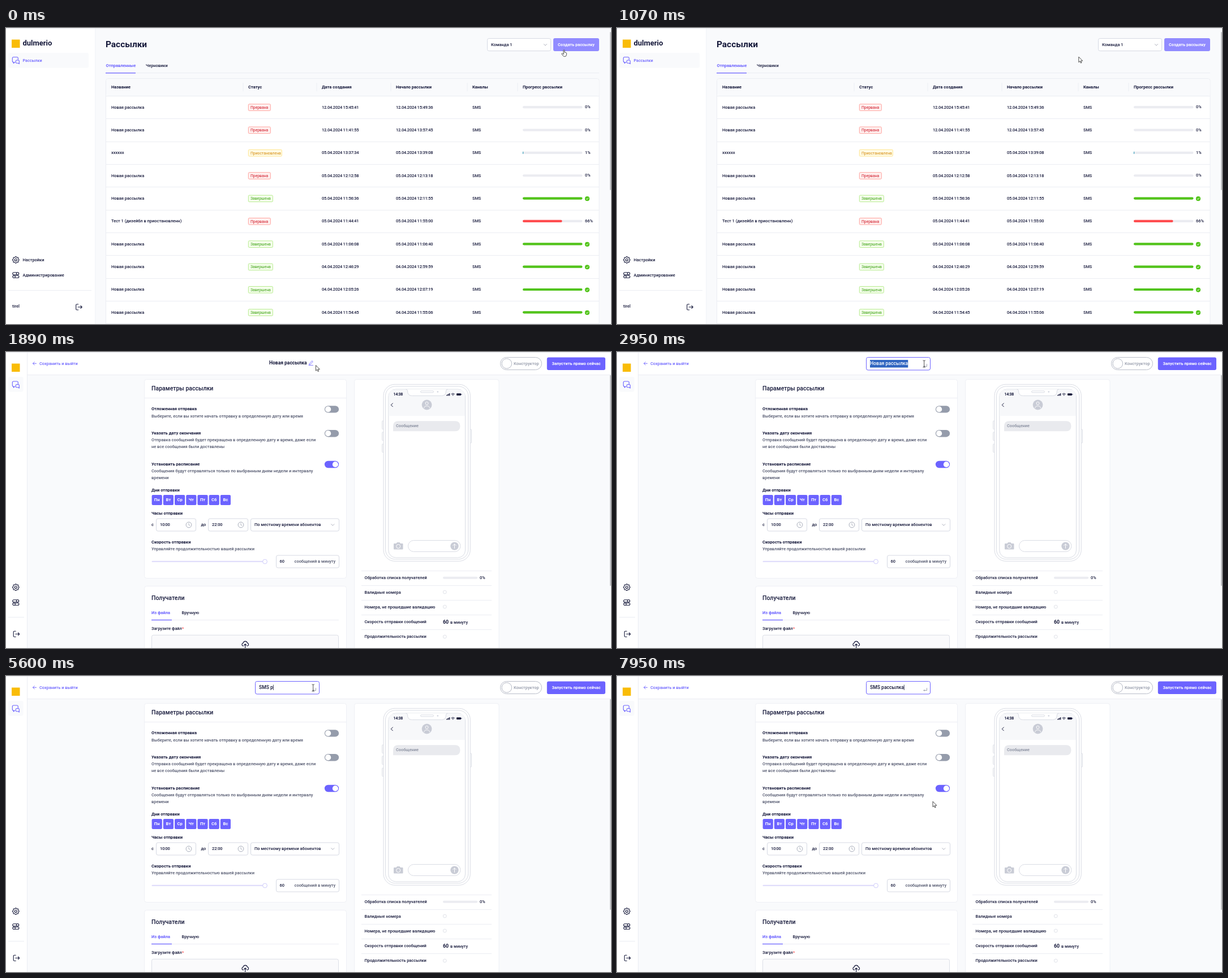
An HTML page that plays this animation: 1069x524 px, repeating every 7990 ms.

```html
<!DOCTYPE html>
<html lang="ru">
<head>
<meta charset="utf-8">
<title>Рассылки</title>
<style>
  html, body { margin: 0; width: 100%; height: 100%; overflow: hidden; background: #f9fafc; }
  #stage { display: block; width: 1069px; height: 524px; }
  text { font-family: Roboto, "Open Sans", sans-serif; white-space: pre; }
  .icon { fill: none; stroke: #15183a; stroke-width: 1.1; stroke-linejoin: round; stroke-linecap: round; }
</style>
</head>
<body>
<svg id="stage" viewBox="0 0 1069 524"></svg>
<script>
const INK = '#15183a', SOFT = '#50556c', GRAY = '#9298a8', LINE = '#ebedf3', EDGE = '#d6d9e3',
      VIOLET = '#6c63ff', PALE = '#918bff', GREEN = '#52c41a';
const LOOP = 7990;

const text = (x, y, s, o = {}) =>
  `<text x="${x}" y="${y}" font-size="${o.size || 7.45}" font-weight="${o.w || 500}" fill="${o.fill || INK}"` +
  ` text-anchor="${o.mid ? 'middle' : 'start'}" letter-spacing="${o.gap || 0}">${s}</text>`;
const rect = (x, y, w, h, fill, r = 0, stroke = 'none', id = '') =>
  `<rect x="${x}" y="${y}" width="${w}" height="${h}" rx="${r}" fill="${fill}" stroke="${stroke}" ${id && `id="${id}"`}/>`;
const disc = (x, y, r, fill, stroke = 'none') =>
  `<circle cx="${x}" cy="${y}" r="${r}" fill="${fill}" stroke="${stroke}"/>`;
const path = (d, stroke = INK, w = 1, fill = 'none') =>
  `<path d="${d}" fill="${fill}" stroke="${stroke}" stroke-width="${w}" stroke-linecap="round" stroke-linejoin="round"/>`;
const hline = (x, y, w, c = LINE) => rect(x, y, w, 1, c);
const chevron = (x, y) => path(`M${x - 2.6} ${y - 1.3}l2.6 2.6l2.6-2.6`, '#a4a9b6', .9);
const group = (id, body) => `<g id="${id}">${body}</g>`;
const icon = (id, body) => `<g id="${id}" class="icon">${body}</g>`;
const bold = { w: 600, size: 7.5 }, white = { w: 600, size: 7.4, fill: '#fff', mid: true };

function tableRow([name, state, made, start, done], i) {
  const y = 140 + i * 40.35;
  const [label, w, bg, edge, ink] = {
    stop: ['Прервана', 39, '#fff1f0', '#ffa39e', '#cf1322'],
    hold: ['Приостановлена', 59, '#fffbe6', '#ffe58f', '#d48806'],
    done: ['Завершена', 43, '#f6ffed', '#b7eb8f', '#389e0d']
  }[state];
  const full = done === 100;
  const color = full ? GREEN : state === 'stop' ? '#ff4d4f' : '#2f9bb8';
  return text(186, y + 2.5, name) +
    rect(428.3, y - 5.3, w, 11.6, bg, 1.5, edge) + text(432, y + 2.8, label, { w: 400, size: 6.8, fill: ink }) +
    text(558, y + 2.5, made, { gap: -.2 }) + text(689, y + 2.5, start, { gap: -.2 }) +
    text(824, y + 2.5, 'SMS', { size: 7.3 }) +
    rect(913, y - 1.9, 105.5, 4.2, '#ebecf1', 2.1) +
    (done ? rect(913, y - 1.9, 1.055 * done, 4.2, color, done > 2 ? 2.1 : .5) : '') +
    (full ? disc(1027, y + .8, 4.1, GREEN) + path(`M1025.3 ${y + .9}l1.2 1.3l2.2-2.6`, '#fff', .9)
          : text(1023, y + 2.2, done + '%')) +
    hline(177, Math.round(y + 20.2), 871);
}

function listPage() {
  const heads = [[186, 'Название'], [428, 'Статус'], [558, 'Дата создания'], [689, 'Начало рассылки'],
                 [824, 'Каналы'], [913, 'Прогресс рассылки']];
  const plain = 'Новая рассылка';
  const rows = [
    [plain, 'stop', '12.04.2024 15:45:41', '12.04.2024 15:49:36', 0],
    [plain, 'stop', '12.04.2024 11:41:55', '12.04.2024 13:57:45', 0],
    ['xxxxxx', 'hold', '05.04.2024 13:37:34', '05.04.2024 13:39:08', 1],
    [plain, 'stop', '05.04.2024 12:12:58', '05.04.2024 12:13:18', 0],
    [plain, 'done', '05.04.2024 11:56:36', '05.04.2024 12:11:55', 100],
    ['Тест 1 (дизейбл в приостановленн)', 'stop', '05.04.2024 11:44:41', '05.04.2024 11:55:00', 66],
    [plain, 'done', '05.04.2024 11:06:08', '05.04.2024 11:06:40', 100],
    [plain, 'done', '04.04.2024 12:46:29', '04.04.2024 12:59:59', 100],
    [plain, 'done', '04.04.2024 12:05:26', '04.04.2024 12:07:19', 100],
    [plain, 'done', '04.04.2024 11:54:45', '04.04.2024 11:55:06', 100]
  ];
  return text(176, 33.6, 'Рассылки', { size: 15.4, w: 600 }) +
    hline(176, 79, 872) + rect(176, 79, 53, 1.3, VIOLET) +
    text(176.5, 69, 'Отправленные', { ...bold, fill: VIOLET }) + text(247, 69, 'Черновики') +
    rect(850.5, 18.5, 112, 22, '#fff', 3, EDGE) + text(857, 31.5, 'Команда 1') + chevron(953, 29.8) +
    rect(967, 18, 81, 23, 'none', 3, VIOLET, 'wave') + rect(967, 18, 81, 23, PALE, 3, 'none', 'create') +
    text(1007.5, 31.6, 'Создать рассылку', white) +
    rect(176.5, 89.5, 871.5, 450, '#fff', 4, LINE) + rect(177, 90, 870.5, 30, '#f9fafc', 4) + hline(177, 120, 871) +
    heads.map(([x, s], i) => text(x, 106.5, s, bold) + (i ? rect(x - 9.5, 97, 1, 15, LINE) : '')).join('') +
    rows.map(tableRow).join('') +
    rect(1067, 7, 2, 280, '#c3c4c8', 1);
}

const toggle = (y, on) => rect(562.9, y - 6.2, 25.2, 12.4, on ? VIOLET : '#959cab', 6.2) +
  disc(on ? 581.9 : 569.1, y, 5.1, '#fff');
const field = (x, y, w) => rect(x + .5, y + .5, w, 22, '#fff', 3, EDGE);
const clock = x => `<g transform="translate(${x} 306)">` + disc(0, 0, 4.9, 'none', '#a9aebb') +
  path('M0-2.7v2.9l2 1', '#a9aebb', .9) + '</g>';

function settingsCard() {
  const desc = (y, s) => text(257, y, s, { fill: SOFT });
  const head = (y, s) => text(257, y, s, { w: 600, size: 7.6 });
  return rect(244.5, 48.5, 357, 352, '#fff', 4, '#eef0f5') + hline(245, 81, 357) +
    text(257, 67.7, 'Параметры рассылки', { size: 10.5 }) +
    head(103.3, 'Отложенная отправка') + toggle(101.4) +
    desc(115.5, 'Выберите, если вы хотите начать отправку в определенную дату или время') +
    head(145.8, 'Указать дату окончания') + toggle(144.2) +
    desc(158, 'Отправка сообщений будет прекращена в определенную дату и время, даже если') +
    desc(170.3, 'не все сообщения были доставлены') +
    head(200.8, 'Установить расписание') + toggle(199, true) +
    desc(213, 'Сообщения будут отправляться только по выбранным дням недели и интервалу') +
    desc(225.3, 'времени') +
    head(246.5, 'Дни отправки') +
    ['Пн', 'Вт', 'Ср', 'Чт', 'Пт', 'Сб', 'Вс'].map((d, i) => {
      const x = 257.6 + 20.2 * i;
      return rect(x, 252.9, 18.2, 18.2, VIOLET, 2) + text(x + 9.1, 264.3, d, { ...white, size: 7.6 });
    }).join('') +
    head(288.2, 'Часы отправки') + text(257, 308, 'с') + text(344.5, 308, 'до') +
    field(265, 294.5, 70) + text(272, 308, '10:00', { gap: -.3 }) + clock(323) +
    field(357, 294.5, 70) + text(364, 308, '22:00', { gap: -.1 }) + clock(415) +
    field(432, 294.5, 156) + text(439, 308, 'По местному времени абонентов') + chevron(577.3, 306) +
    head(338.6, 'Скорость отправки') + desc(351, 'Управляйте продолжительностью вашей рассылки') +
    rect(257.5, 369.8, 200, 2.2, '#e0ddfb', 1.1) + disc(457.5, 371, 3.9, '#fff', '#cfccfb') +
    field(477, 359.5, 111) + text(483.5, 373, '60') + text(509.5, 373, 'сообщений в минуту', { fill: SOFT });
}

function recipientsCard() {
  return rect(244.5, 414.5, 357, 140, '#fff', 4, '#eef0f5') +
    text(257, 438.8, 'Получатели', { size: 10.5 }) +
    text(257, 464, 'Из файла', { ...bold, fill: VIOLET }) + text(310.5, 464, 'Вручную') +
    hline(257, 474, 331) + rect(257, 473.8, 36, 1.3, VIOLET) +
    text(257, 492.2, 'Загрузите файл <tspan fill="#ff4d4f" dx="-1.5">*</tspan>', { size: 7.3 }) +
    rect(257.5, 501.2, 330, 50, '#fafafc', 3, '#dcdfe7') +
    path('M419.5 520.5q-2.6-.4-2.6-2.8q.1-2.2 2.2-2.6q.8-3 3.6-3q3 0 3.8 3q2.1.5 2.1 2.7q0 2.3-2.6 2.7M422.7 524v-7m-2 2l2-2l2 2', INK, 1.1);
}

function phoneCard() {
  const ghost = '#d9dce4';
  const stats = ['Обработка списка получателей', 'Валидные номера', 'Номера, не прошедшие валидацию',
                 'Скорость отправки сообщений', 'Продолжительность рассылки'];
  const keys = [122, 142, 163].map(y => rect(664.7, y, 2.5, 14.5, '#fff', 1, ghost)).join('');
  return rect(615.5, 48.5, 255.5, 500, '#fff', 4, '#eef0f5') +
    keys + rect(820, 137, 2.5, 24, '#fff', 1, ghost) +
    rect(667, 57.3, 153.3, 313, '#fff', 20, ghost) + rect(670.5, 60.8, 146.3, 306, '#fff', 17, ghost) +
    rect(675.8, 66, 135.7, 298, '#fff', 13, ghost) +
    path('M676.3 113V79q0-12.5 12.5-12.5h110q12.3 0 12.3 12.5v34z', 'none', 0, '#f7f8fa') +
    path('M707 66q2.5 0 2.5 3q0 8.5 8 8.5h52q8 0 8-8.5q0-3 2.5-3', ghost, 1, '#fff') +
    rect(732.5, 68.8, 23, 3, '#fff', 1.5, ghost) + disc(762.8, 70.5, 1.4, ghost) +
    text(684.5, 77, '14:38', { w: 700, size: 7, gap: -.3 }) +
    [0, 1, 2, 3].map(i => rect(778 + i * 1.7, 76 - i, 1.2, 1.4 + i, INK)).join('') +
    path('M787 74.2q2.7-2.3 5.4 0M788.2 75.6q1.5-1.2 3 0', INK, .9) + disc(789.7, 76.8, .6, INK) +
    rect(796, 73.2, 8, 3.8, INK, 1) + rect(804.5, 74.2, .8, 1.8, INK) +
    path('M683.3 90.8l-3 3l3 3', INK, 1) +
    disc(743.6, 93.5, 8.9, '#c9ccd6') + disc(743.6, 90.8, 2.5, 'none', '#fff') +
    path('M738.7 99q0-3.5 4.9-3.5q4.9 0 4.9 3.5', '#fff', .9) +
    path('M684 140.3v-9q0-9 9-9h100.500q9 0 9 9q0 9-9 9z', 'none', 0, '#e9eaee') +
    text(689, 133.4, 'Сообщение', { fill: '#858b9c', size: 7.4 }) +
    path('M686 339h3.5l1.5-2h4.5l1.5 2h3.5q1 0 1 1v8.5q0 1-1 1h-14.5q-1 0-1-1v-8.5q0-1 1-1z', 'none', 0, '#c9ccd6') +
    disc(693.2, 344, 3.5, '#c9ccd6', '#fff') +
    rect(710.5, 333.5, 92.5, 20, '#fff', 10, ghost) + disc(792.5, 343.6, 7.2, '#c9ccd6') +
    path('M792.5 347.5v-7.5m-2.7 2.6l2.7-2.7l2.7 2.7', '#fff', 1) +
    stats.map((s, i) => hline(628, Math.round(387 + i * 26.1), 230) + text(633.5, 402 + i * 26.1, s)).join('') +
    rect(772, 397.8, 61, 4, '#ebecf1', 2) + text(837, 401.8, '0%') +
    [425, 451, 504].map(y => disc(775.3, y, 2.9, '#fff', '#e0e2e9')).join('') +
    text(772, 480.8, '60', { w: 700, size: 8.9 }) + text(785, 480.5, 'в минуту');
}

function formPage() {
  return rect(38, 1, 1031, 39, '#fff') + hline(38, 40, 1031) +
    path('M53.5 20.3h-6m2.7-2.7l-2.7 2.7l2.7 2.7', VIOLET, .9) +
    text(59, 23.4, 'Сохранить и выйти', { fill: VIOLET }) +
    group('title', text(465, 21.9, 'Новая рассылка', { size: 8.5, w: 600 }) +
      path('M536.3 20.5l4.4-5l1.6 1.5l-4.4 4.8l-2 .5zM535 23.5h7.5', VIOLET, .8)) +
    group('editor', rect(440.5, 9.5, 113, 22.5, '#fff', 3, VIOLET, 'box') +
      rect(447, 14, 0, 13.5, '#2f65c0', 0, 'none', 'selection') +
      '<text x="447" y="23.2" font-size="8.6" font-weight="500" id="value"><tspan id="first"></tspan><tspan id="last"></tspan></text>' +
      rect(447, 15.5, .8, 9.5, INK, 0, 'none', 'caret') +
      path('M547.5 21.5v4h-5.5m1.3-1.3l-1.3 1.3l1.3 1.3', '#8b8f9d', .8)) +
    rect(873.5, 9.5, 73, 22, '#fff', 11, '#b9bdc9') + disc(884.8, 20.5, 8.8, '#fff', '#b3b7c4') +
    text(897, 22.6, 'Конструктор', { fill: GRAY }) +
    rect(955.8, 9.5, 103.2, 22.6, VIOLET, 3) + text(1007.5, 22.7, 'Запустить прямо сейчас', white) +
    settingsCard() + recipientsCard() + phoneCard() +
    rect(1067, 41, 2, 373, '#c3c4c8', 1);
}

function cog() {
  const points = Array.from({ length: 64 }, (_, i) => {
    const a = i * Math.PI / 32, r = 5.2 + .65 * Math.cos(8 * a);
    return `${(r * Math.cos(a)).toFixed(2)},${(r * Math.sin(a)).toFixed(2)}`;
  });
  return `<polygon points="${points.join(' ')}"/><circle r="2"/>`;
}

function sidebar() {
  const slider = '<path d="M1-4.8h-4.6a2 2 0 0 0 0 4h4.6"/><circle cx="3.2" cy="-2.8" r="2.2"/>';
  return '<svg id="side" width="158" height="524">' +
    rect(0, 0, 158, 524, '#fff') + rect(4, 44, 142, 26.5, '#f9fafc', 3, 'none', 'item') +
    rect(10, 20.5, 14.5, 14.5, '#f9bc07') +
    icon('chat', '<g stroke="#6c63ff"><path d="M-1.5 3h-.5l-2 2v-2q-2 0-2-2v-5q0-2 2-2h6q2 0 2 2v2.5"/>' +
      '<path d="M1.5-.5h3q1.5 0 1.5 1.5v5l-1.5-1.3h-3q-1.5 0-1.5-1.5v-2.2q0-1.500 1.500-1.500z"/></g>') +
    icon('gear', cog()) +
    icon('admin', slider + `<g transform="rotate(180)">${slider}</g>`) +
    icon('exit', '<path d="M-1-5h-2.5q-1.5 0-1.5 1.5v7q0 1.5 1.5 1.5h2.5M-1.5 0h7m-2.3-2.3l2.3 2.3l-2.3 2.3"/>') +
    rect(4, 464, 147, 1, LINE, 0, 'none', 'rule') +
    group('labels', text(29.5, 30.5, 'dulmerio', { size: 13, w: 700 }) +
      text(29.5, 59.5, 'Рассылки', { size: 7.2, fill: VIOLET }) +
      text(29.5, 412.6, 'Настройки') + text(29.5, 439.5, 'Администрирование') +
      text(11, 495.2, 'tirel')) +
    rect(157, 0, 1, 524, LINE, 0, 'none', 'edge') + '</svg>';
}

const pointers =
  group('arrow', path('M0 0v9.2l2.2-2l1.5 3.4l1.5-.7l-1.5-3.2h2.8z', '#222', .8, '#fff')) +
  group('hand', path('M-.9.8q.9-1.4 1.8 0v3.7l2.5.5q1.3.4 1.2 1.8l-.6 3.3q-.4 1.7-2 1.7h-1.7q-1.2 0-1.9-1l-2.6-3.6q.5-1.3 1.7-.6l1.6 1.2z', '#222', .8, '#fff')) +
  group('beam', path('M-1.8-6h1.3l.5.5l.5-.5h1.3M0-5.5v11M-1.8 6h1.3l.5-.5l.5.5h1.3', '#222', .8));

document.getElementById('stage').innerHTML = rect(0, 0, 1069, 524, '#f9fafc') +
  group('list', listPage()) + group('form', formPage()) + sidebar() + hline(0, 0, 1069, '#e8e9ee') +
  group('pointer', pointers);

const $ = id => document.getElementById(id);
const set = (id, attrs) => { for (const k in attrs) $(id).setAttribute(k, attrs[k]); };
const show = (id, on) => { $(id).style.display = on ? '' : 'none'; };
const at = (id, x, y) => set(id, { transform: `translate(${x} ${y})` });
const clamp = v => Math.max(0, Math.min(1, v));
const lerp = (a, b, k) => a + (b - a) * k;

const route = [
  [840, 986, 38.5], [960, 892, 57.5], [1400, 590, 33.5], [1500, 590, 33.5], [1670, 554, 48], [1800, 554, 48],
  [1890, 547.5, 24], [2050, 539.5, 19], [2380, 539.5, 19], [2460, 542.7, 21], [7190, 542.7, 21],
  [7440, 447, 149], [7650, 447, 149], [7850, 573, 235], [7950, 558, 222.5]
];
const typed = 'SMS рассылка';
const strokes = [4480, 4710, 4890, 5220, 5600, 5680, 5880, 6060, 6150, 6300, 6430, 6660];

function spot(t) {
  const i = route.findIndex(p => p[0] > t);
  if (i === 0) return route[0].slice(1);
  if (i < 0) return route[route.length - 1].slice(1);
  const [a, b] = [route[i - 1], route[i]], k = (t - a[0]) / (b[0] - a[0]);
  return [lerp(a[1], b[1], k), lerp(a[2], b[2], k)];
}

function drawSide(t) {
  const k = 1 - (1 - clamp((t - 1100) / 200)) ** 2, w = lerp(158.5, 38, k);
  set('side', { width: w });
  set('edge', { x: w - 1 });
  set('item', { width: lerp(142, 26.5, k) });
  set('rule', { y: lerp(464, 469, k), width: lerp(147, 28, k) });
  at('chat', 17.3, lerp(57.5, 58, k));
  at('gear', 17.3, lerp(410.5, 416.5, k));
  at('admin', 17.3, lerp(437.5, 443.5, k));
  at('exit', lerp(128.7, 18.2, k), lerp(494, 499.3, k));
  show('labels', k < 1);
}

function drawEditor(t) {
  const editing = t >= 2380;
  show('title', !editing);
  show('editor', editing);
  if (!editing) return;
  const draft = t < 4200;
  $('first').textContent = draft ? 'Новая ' : typed.slice(0, strokes.filter(s => s <= t).length);
  $('last').textContent = draft ? 'рассылка' : '';
  const word = draft && t >= 2870, all = draft && t >= 2950;
  set('first', { fill: all ? '#fff' : INK });
  set('last', { fill: word ? '#fff' : INK });
  set('box', { stroke: t < 2640 ? PALE : VIOLET });
  const end = $('value').getComputedTextLength();
  const from = all ? 0 : $('first').getComputedTextLength();
  set('selection', { x: 447 + from, width: word ? Math.max(0, end - from) : 0 });
  set('caret', { x: 447 + end });
  show('caret', !word);
}

function drawButton(t) {
  const k = clamp((t - 200) / 520), d = 2.5 * (1 - (1 - k) ** 3);
  set('wave', { x: 967 - d / 2, y: 18 - d / 2, width: 81 + d, height: 23 + d,
    'stroke-width': d, opacity: t < 200 ? 0 : .4 * (1 - k) });
  set('create', { fill: t >= 200 && t < 300 ? '#7d76f5' : PALE });
}

function draw(t) {
  show('list', t < 1100);
  show('form', t >= 1500);
  drawSide(t);
  drawButton(t);
  if (t >= 1500) drawEditor(t);
  const kind = t < 880 || (t >= 1980 && t < 2400) ? 'hand' : t >= 2400 && t < 7230 ? 'beam' : 'arrow';
  for (const id of ['hand', 'beam', 'arrow']) show(id, id === kind);
  at('pointer', ...spot(t));
}

const began = performance.now();
function tick() {
  draw((performance.now() - began) % LOOP);
  requestAnimationFrame(tick);
}
tick();
</script>
</body>
</html>
```
